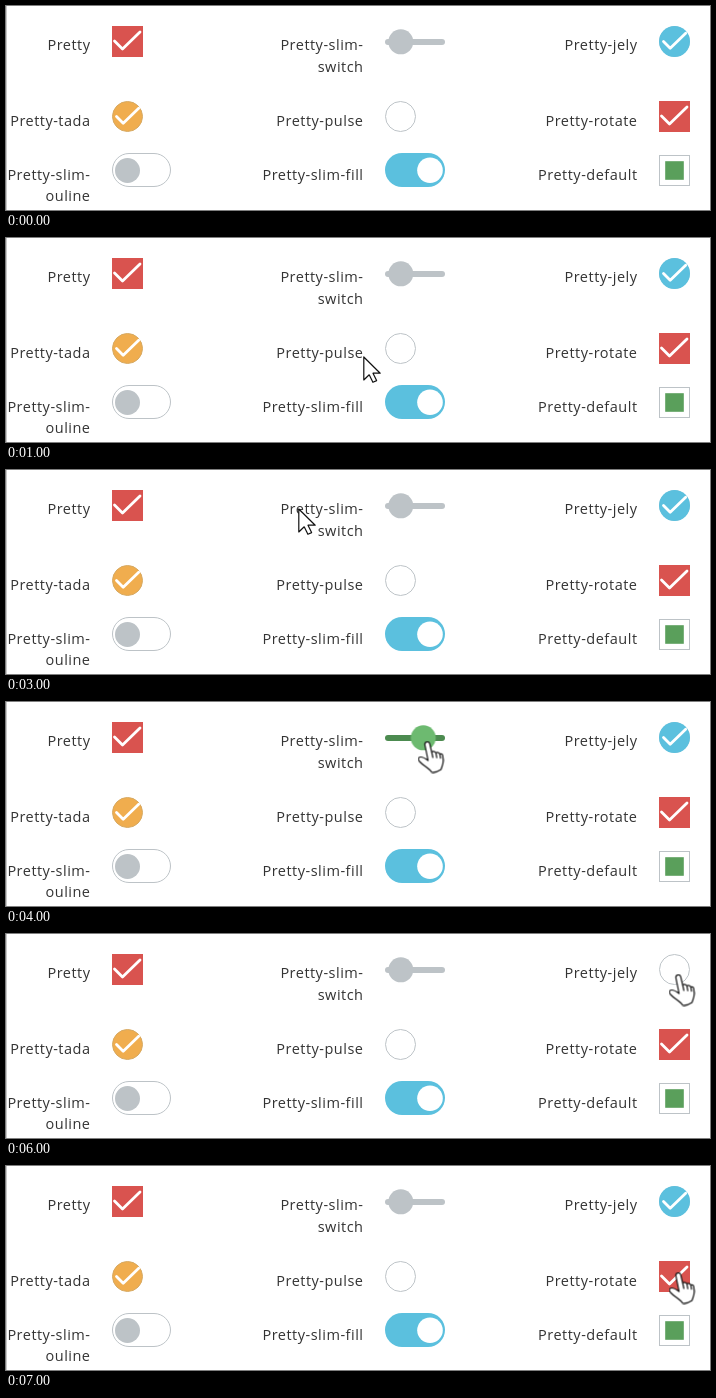
An HTML page for the animation above (8000 ms loop, 704 px wide and 204 px high).

```html
<!DOCTYPE html>
<html lang="en">
<head>
<meta charset="utf-8">
<title>Pretty checkboxes</title>
<style>
  html, body { margin: 0; width: 100%; height: 100%; overflow: hidden; background: #fff; }
  svg { display: block; width: 704px; height: 204px; }
  text {
    font: 14.5px "Open Sans", "Noto Sans", sans-serif;
    letter-spacing: .5px;
    text-anchor: end;
    fill: #333;
  }
  .red { fill: #d9534f; }
  .blue { fill: #5bc0de; }
  .grey { fill: #bdc3c7; }
  .box { fill: #fff; stroke: #bdc3c7; }
  .check { fill: none; stroke: #fff; stroke-width: 2.8; stroke-linecap: round; stroke-linejoin: round; }
  .cursor { fill: #fff; stroke: #111; stroke-width: 1.2; stroke-linejoin: round; stroke-linecap: round; }

  /* Eight one-second poses, each held until the next. */
  .step { animation: 8s step-end infinite; }
  .arrow { animation-name: arrow; }
  .hand { animation-name: hand; }
  .press { animation-name: press; }
  .tick { animation-name: tick; }
  .track { animation-name: track; }
  .knob { animation-name: knob; }
  .jelly { animation-name: jelly; }

  @keyframes arrow {
    0%, 25%, 50%, 75%, 100% { transform: translate(-60px, -60px); }
    12.5% { transform: translate(357px, 118px); }
    37.5% { transform: translate(292px, 38px); }
    62.5% { transform: translate(483px, 30px); }
  }
  @keyframes hand {
    0%, 37.5%, 62.5%, 100% { transform: translate(-60px, -60px); }
    25% { transform: translate(127.5px, 33.5px); }
    50% { transform: translate(421.5px, 39.5px); }
    75% { transform: translate(672.5px, 40.5px); }
    87.5% { transform: translate(672.5px, 106.5px); }
  }
  @keyframes press {
    0%, 37.5%, 100% { fill: #d9534f; stroke: #d9534f; }
    25% { fill: #c8bfc1; stroke: #c48889; }
  }
  @keyframes tick {
    0%, 37.5%, 100% { stroke: #fff; }
    25% { stroke: #a4a7a9; }
  }
  @keyframes track {
    0%, 75%, 100% { fill: #bdc3c7; }
    50% { fill: #4c8b50; }
    62.5% { fill: #b0bdb6; }
  }
  @keyframes knob {
    0%, 75%, 100% { fill: #bdc3c7; transform: translateX(0); }
    50% { fill: #6dba70; transform: translateX(22.5px); }
    62.5% { fill: #b1c0ba; transform: translateX(4px); }
  }
  @keyframes jelly {
    0%, 87.5%, 100% { opacity: 1; }
    75% { opacity: 0; }
  }
</style>
</head>
<body>
<svg viewBox="0 0 704 204">
  <defs>
    <path id="wide" d="M-13-.5l8 8 17.500-17"/>
    <path id="small" d="M-11 0l6.700 6.700 15.500-15"/>
  </defs>

  <rect width="1" height="204" fill="#c8c8c8"/>

  <text x="84.500" y="44">Pretty</text>
  <text x="357.500" y="44">Pretty-slim-</text>
  <text x="357.500" y="66">switch</text>
  <text x="631.500" y="44">Pretty-jely</text>
  <text x="84.500" y="120">Pretty-tada</text>
  <text x="357.500" y="120">Pretty-pulse</text>
  <text x="631.500" y="120">Pretty-rotate</text>
  <text x="84.500" y="174">Pretty-slim-</text>
  <text x="84.500" y="195">ouline</text>
  <text x="357.500" y="174">Pretty-slim-fill</text>
  <text x="631.500" y="174">Pretty-default</text>

  <rect class="step press" x="106.5" y="20.5" width="30" height="30"/>
  <use class="check step tick" href="#wide" x="121.5" y="35.5"/>

  <rect class="step track" x="379" y="33" width="60" height="6" rx="3"/>
  <circle class="step knob" cx="394.8" cy="35.8" r="12.5"/>

  <circle class="box" cx="668.5" cy="35.5" r="15"/>
  <g class="step jelly">
    <circle class="blue" cx="668.5" cy="35.5" r="15.5"/>
    <use class="check" href="#small" x="668.5" y="35.5"/>
  </g>

  <circle cx="121.5" cy="110.5" r="15" fill="#f0ad4e" stroke="#d6a962"/>
  <use class="check" href="#small" x="121.5" y="110.5"/>

  <circle class="box" cx="394.5" cy="110.5" r="15"/>

  <rect class="red" x="653" y="95" width="31" height="31"/>
  <use class="check" href="#wide" x="668.5" y="110.5"/>

  <rect class="box" x="106.5" y="147.5" width="58" height="33" rx="16.5"/>
  <circle class="grey" cx="121.5" cy="164.5" r="12.5"/>

  <rect class="blue" x="379" y="147" width="60" height="34" rx="17"/>
  <circle cx="424" cy="164.3" r="12.8" fill="#fff"/>

  <rect class="box" x="653.5" y="149.5" width="30" height="30"/>
  <rect x="659.2" y="155.2" width="18.6" height="18.6" fill="#5a9f5b"/>

  <path class="cursor step arrow" d="M.8 1V24l5.4-5.2 3.7 7.5 3.7-1.7-3.6-7.4h7.2z"/>
  <path class="cursor step hand" d="M.6 19L-2.6 3.3C-3 .2 1.4-.9 2.2 2.2L4.2 10.5q2.4-1.4 4.2.8 2.2-1.2 3.9 1.1 2.4-.6 3 2l.4 4.5c.2 4-1.2 6-2.2 9.2q-4.500 3.200-9.300 2.600C1.500 26.500-4.500 24-8 20Q-10.500 16.800-8 15.700-5 14.700.6 19zM4.200 10.500l1.200 5.500M8.400 11.300l.9 4.800M12.300 12.400l.7 4.200"/>
</svg>
</body>
</html>
```
